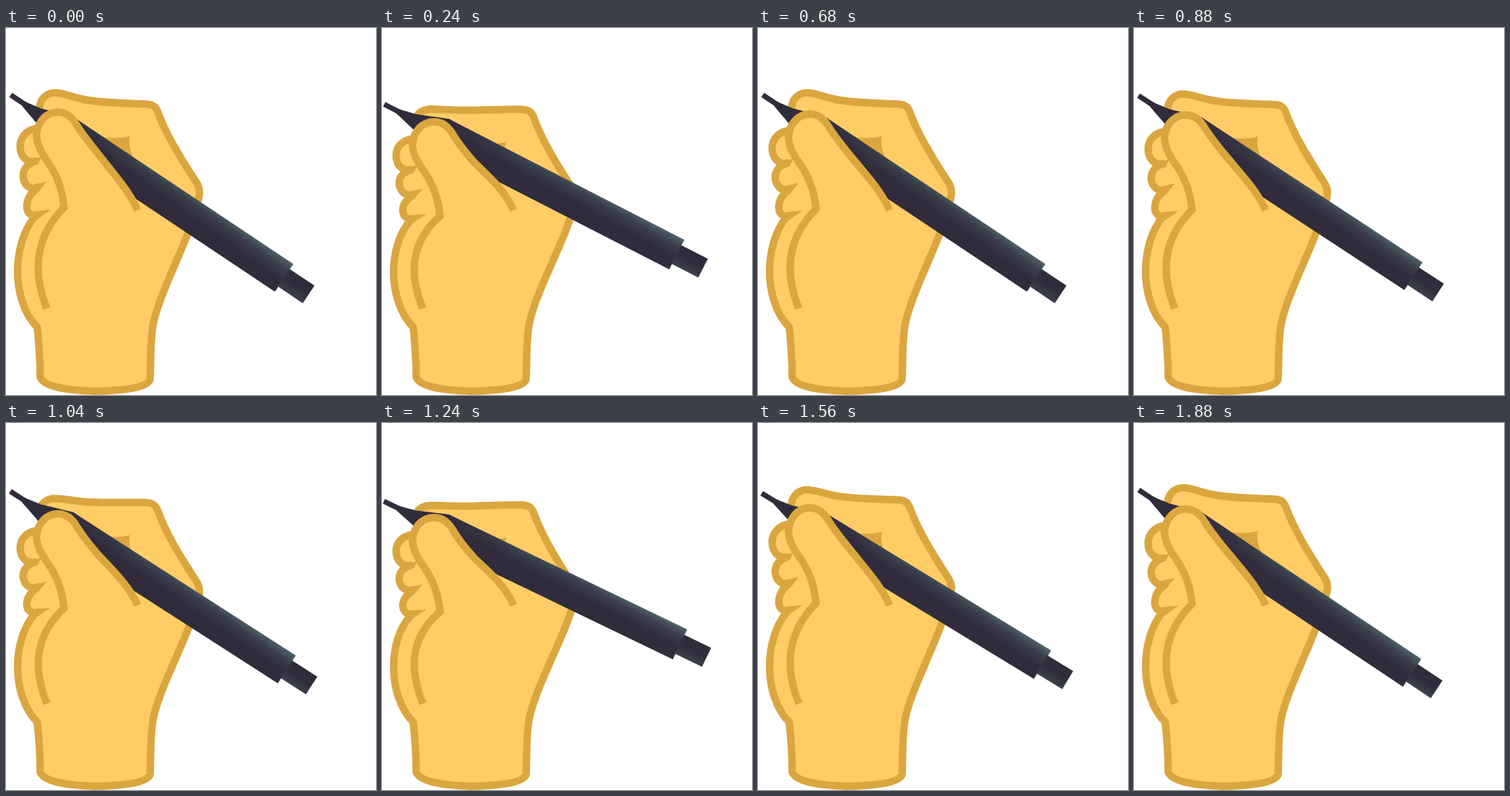
An HTML page that plays this animation: 498 by 493 pixels, repeating every 1920 ms.

```html
<!DOCTYPE html>
<html>
<head>
<meta charset="utf-8">
<title>Writing hand</title>
<style>
html, body { margin: 0; width: 100%; height: 100%; overflow: hidden; background: #fff; }
svg { display: block; width: 498px; height: 493px; }
.skin { fill: #ffcc66; }
.line { fill: none; stroke: #daa63f; stroke-width: 10; stroke-miterlimit: 8; }
.both { fill: #ffcc66; stroke: #daa63f; stroke-width: 10; stroke-linejoin: round; }
.crease { fill: #daa63f; }
</style>
</head>
<body>
<svg viewBox="0 0 498 493">
  <defs>
    <linearGradient id="sheen" gradientUnits="userSpaceOnUse" x1="440" y1="-25" x2="439" y2="5">
      <stop offset="0" stop-color="#546e72"/>
      <stop offset=".5" stop-color="#3a3f4c"/>
      <stop offset="1" stop-color="#312c3b"/>
    </linearGradient>
    <linearGradient id="shade" gradientUnits="userSpaceOnUse" x1="84" y1="0" x2="190" y2="0">
      <stop offset="0" stop-color="#312c3b"/>
      <stop offset="1" stop-color="#312c3b" stop-opacity="0"/>
    </linearGradient>
    <linearGradient id="cap" x1="0" y1="0" x2="0" y2="1">
      <stop offset="0" stop-color="#312c3b"/>
      <stop offset=".5" stop-color="#312c3b"/>
      <stop offset="1" stop-color="#3a424c"/>
    </linearGradient>
  </defs>
  <path id="body" class="both"/>
  <path id="fold" class="crease"/>
  <path id="palm" class="skin"/>
  <path id="finger1" class="both"/>
  <path id="finger2" class="both"/>
  <path id="finger3" class="both"/>
  <path id="gaps" class="crease"/>
  <g id="pen">
    <path fill="#312c3b" d="M-2-3.5H18L23-4L42-7.5L84-22H90V22.6H84L23 5L18 3.5H-2z"/>
    <path fill="url(#sheen)" d="M84-22H440.5V22.6H84z"/>
    <path fill="url(#shade)" d="M84-22H190V22.6H84z"/>
    <path fill="url(#cap)" d="M440-13.7H480.3V14.6H440z"/>
  </g>
  <path id="thumbFill" class="skin"/>
  <path id="thumbLine" class="line"/>
</svg>
<script>
const FRAME = 40, CYCLE = 24;

// Key poses of one stroke: a large swing, then a small one
const keys = [0, 2, 7, 11, 13, 14, 15, 16, 17, 20, 23, 24];
const penLift = [0, 1, 8, 10.9, 12.2, 11.2, 2.4, .4, 0, 1.5, 0, 0];
const handDrop = [0, .54, .88, 1, .95, .6, .1, 0, 0, .2, 0, 0];
const thumbDrop = [0, .53, .82, 1, .9, .45, .06, 0, .15, .35, .15, 0];

function at(values, f) {
  const i = keys.findIndex(k => k > f);
  const k = (f - keys[i - 1]) / (keys[i] - keys[i - 1]);
  return values[i - 1] + (values[i] - values[i - 1]) * k;
}

const el = id => document.getElementById(id);
const shape = (id, d) => el(id).setAttribute('d', d);

function drawHand(drop) {
  const y = (rest, move) => rest + move * drop;
  shape('body', `M45 ${y(108, 20)}C46 ${y(93, 25)} 57 ${y(87, 27)} 66 ${y(87, 27)}
    C78 ${y(87, 27)} 85 ${y(92, 22)} 105 ${y(96, 18)}
    C130 ${y(101, 12)} 160 ${y(101, 10)} 185 ${y(102, 9)}
    C197 ${y(102, 9)} 201 ${y(105, 9)} 204 ${y(112, 9)}
    C215 ${y(142, 10)} 232 ${y(170, 10)} 256 ${y(207, 10)}
    Q262 ${y(216, 10)} 260 ${y(225, 10)}
    C250 280 207 352 198 398
    C194 420 195 450 194 472C190 483 160 487 120 488
    C80 487 50 481 46 469C46 445 44 420 42 402
    C7 366 8 292 38 ${y(254, 6)}L60 ${y(200, 10)}z`);
  shape('fold', `M116 ${y(144, 10)}Q147 ${y(151, 10)} 167 ${y(145, 10)}
    Q162 ${y(162, 10)} 178 ${y(184, 10)}L160 ${y(176, 10)}L130 ${y(160, 10)}z`);
}

function drawThumb(drop) {
  const y = (rest, move) => rest + move * drop;
  shape('palm', `M38 ${y(140, 17)}L58 ${y(180, 16)}L78 ${y(242, 15)}L44 ${y(254, 6)}L34 ${y(200, 13)}z`);
  shape('finger1', `M42 ${y(178, 14)}C30 ${y(184, 15)} 19 ${y(173, 16)} 19 ${y(159, 16)}
    C19 ${y(147, 17)} 28 ${y(136, 18)} 42 ${y(135, 18)}`);
  shape('finger2', `M40 ${y(215, 12)}C32 ${y(217, 11)} 24 ${y(211, 12)} 23 ${y(199, 13)}
    C23 ${y(189, 13)} 30 ${y(182, 14)} 40 ${y(179, 15)}`);
  shape('finger3', `M42 ${y(251, 7)}C35 ${y(253, 5)} 28 ${y(250, 6)} 28 ${y(240, 6)}
    C28 ${y(230, 9)} 34 ${y(221, 11)} 42 ${y(215, 12)}`);
  // Cover the chord ends, then taper the outlines between the fingers
  shape('gaps', `M36 ${y(176, 15)}L48 ${y(173, 15)}L42 ${y(184, 14)}z
    M38 ${y(210, 12)}L55 ${y(206, 13)}L44 ${y(220, 11)}z
    M40 ${y(246, 7)}L60 ${y(244, 8)}L42 ${y(257, 6)}z`);

  const outline = `C76 ${y(216, 17)} 68 ${y(197, 16)} 57 ${y(181, 16)}
    C46 ${y(166, 16)} 41 ${y(155, 16)} 41 ${y(144, 17)}
    C42 ${y(125, 17)} 55 ${y(113, 17)} 70 ${y(113, 17)}
    C81 ${y(113, 17)} 89 ${y(120, 16)} 95 ${y(130, 16)}
    C102 ${y(142, 16)} 113 ${y(155, 17)} 124 ${y(169, 15)}
    C144 ${y(195, 6)} 167 ${y(220, 0)} 177 245`;
  const start = `78 ${y(241, 15)}`;
  shape('thumbFill', `M${start}${outline}z`);
  shape('thumbLine', `M55 377C36 330 38 ${y(282, 8)} ${start}${outline}`);
}

function draw(now) {
  const f = Math.floor(now / FRAME) % CYCLE;
  drawHand(at(handDrop, f));
  drawThumb(at(thumbDrop, f));
  el('pen').setAttribute('transform',
    `rotate(${-at(penLift, f)} 114 125) translate(8 91) rotate(33.7)`);
}

const begin = performance.now();
function tick() {
  draw(performance.now() - begin);
  requestAnimationFrame(tick);
}
tick();
</script>
</body>
</html>
```
